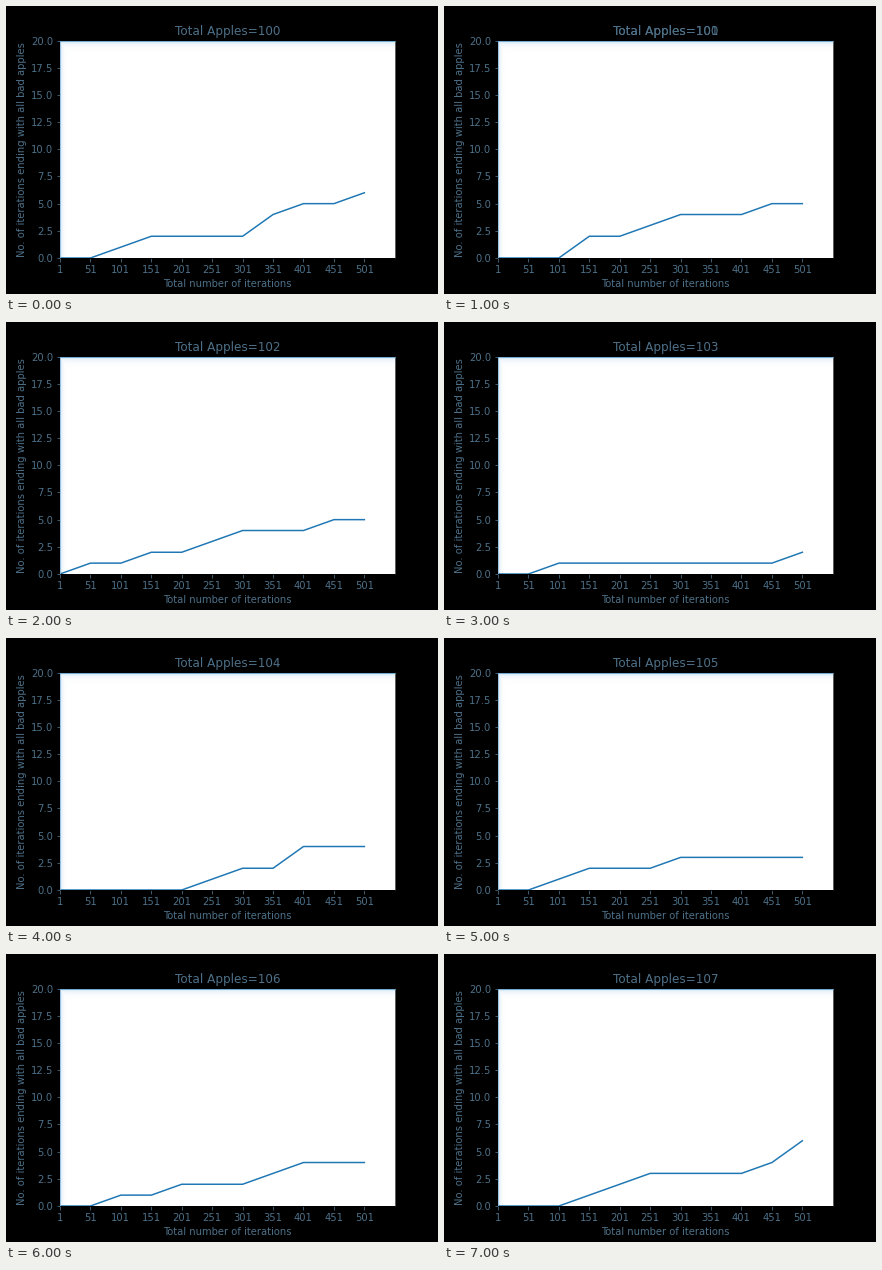
Write a matplotlib script that moves like this. It is 432 px wide and 288 px high and loops after 8 s.

```python
import numpy as np
import matplotlib.pyplot as plt
from matplotlib.animation import FuncAnimation

plt.rcParams["font.family"] = "DejaVu Sans"

BLUE = "#1f77b4"
INK = "#4d7088"
STEPS = np.arange(1, 551, 50)
# Steps at which each run gains one more all-bad ending.
GAINS = [
    (2, 3, 7, 7, 8, 10),
    (3, 3, 5, 6, 9),
    (1, 3, 5, 6, 9),
    (2, 10),
    (5, 6, 8, 8),
    (2, 3, 6),
    (2, 4, 7, 8),
    (3, 4, 5, 9, 10, 10),
]


def counts(gains):
    """Running total of gains at every step."""
    return np.cumsum(np.bincount(gains, minlength=len(STEPS)))


def edge_glow(width, height):
    """Pale blue that fades inwards from the top and left edges."""
    y, x = np.mgrid[:height, :width]
    glow = np.empty((height, width, 4))
    glow[..., :3] = (0.35, 0.65, 0.88)
    glow[..., 3] = np.maximum(0.45 * np.exp(-y / 2.5), 0.35 * np.exp(-x / 1.5))
    return glow


fig = plt.figure(figsize=(6, 4), dpi=72, facecolor="black")
ax = fig.add_axes([0.125, 0.125, 0.775, 0.755])
ax.imshow(edge_glow(335, 217), extent=(0, 1, 0, 1), aspect="auto",
          interpolation="nearest", transform=ax.transAxes, zorder=0)
ax.set(xlim=(1, 551), ylim=(0, 20), xticks=STEPS,
       yticks=np.arange(0, 20.1, 2.5))
ax.yaxis.set_major_formatter("{x:.1f}")
ax.tick_params(color=INK, labelcolor=INK)
ax.set_xlabel("Total number of iterations", color=INK)
ax.set_ylabel("No. of iterations ending with all bad apples", color=INK)

for side, color in (("top", "#5f9cc8"), ("left", "#8fbcdc"),
                    ("right", "#777777"), ("bottom", "black")):
    ax.spines[side].set_color(color)

line, = ax.plot(STEPS, counts(GAINS[0]), color=BLUE, lw=1.5)
title = ax.set_title("Total Apples=100", color=INK)
# The first title shows through under the second one.
ghost = ax.text(0.5, 1, "Total Apples=100", fontsize=12, color=INK,
                ha="center", va="baseline",
                transform=title.get_transform(), zorder=2)


def update(i):
    line.set_ydata(counts(GAINS[i]))
    title.set_text(f"Total Apples={100 + i}")
    ghost.set_visible(i == 1)
    return line, title, ghost


anim = FuncAnimation(fig, update, frames=len(GAINS), interval=1000,
                     repeat=True, repeat_delay=0, blit=False)
plt.show()
```
